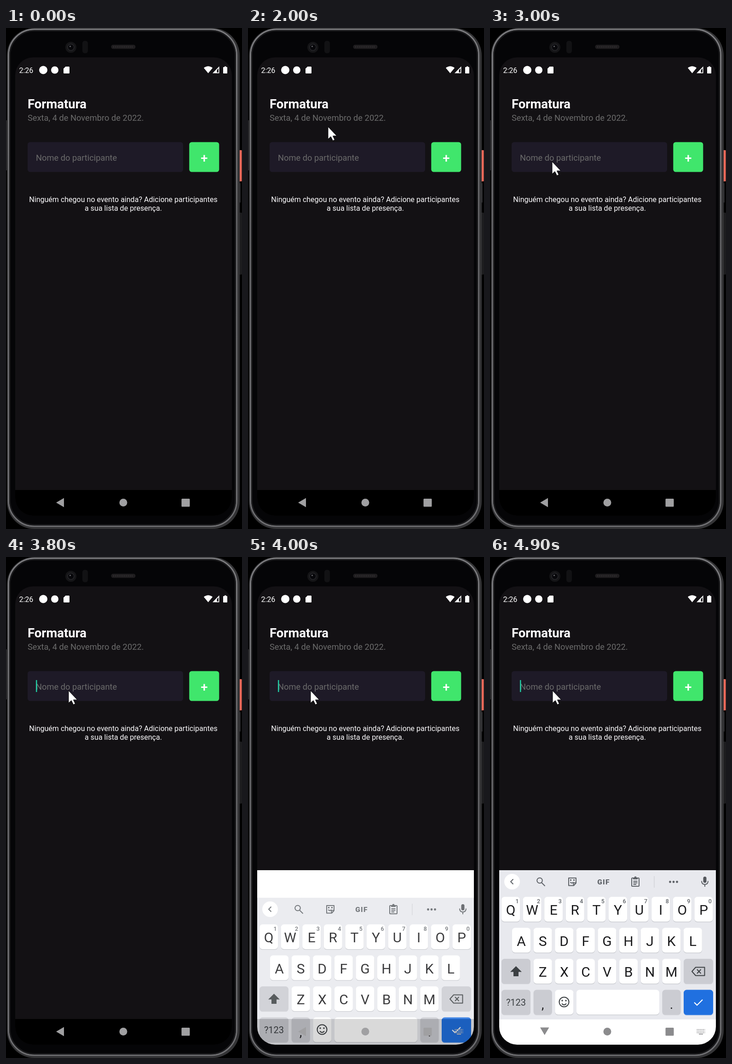
Write an HTML page that moves like this. It is 513 by 1091 pixels and loops after 5000 ms.

```html
<!DOCTYPE html>
<html lang="pt">
<head>
<meta charset="utf-8">
<title>Lista de presença</title>
<style>
  html, body { margin: 0; width: 100%; height: 100%; overflow: hidden; background: #000; }
  svg { display: block; width: 513px; height: 1091px; font-family: Roboto, sans-serif; }
  .mid { text-anchor: middle; }
  .line { fill: none; stroke: #5f6368; stroke-width: 2; stroke-linejoin: round; }
  .solid { fill: #5f6368; }
</style>
</head>
<body>
<svg viewBox="0 0 513 1091">
  <defs>
    <clipPath id="screen"><rect x="20" y="64" width="471" height="998" rx="39"/></clipPath>
    <linearGradient id="rim" x1="0" y1="0" x2="0" y2="1">
      <stop offset="0" stop-color="#7d7d80"/>
      <stop offset=".4" stop-color="#636366"/>
      <stop offset="1" stop-color="#707073"/>
    </linearGradient>
    <g id="clip">
      <rect class="line" x="-8" y="-8" width="16" height="18" rx="1.5"/>
      <path class="solid" d="M-5-9H-2.5a2.5 2.5 0 0 1 5 0H5V-5H-5Z"/>
      <path class="line" d="M-4.5-1H4.5M-4.5 2.5H4.5M-4.5 6H2"/>
    </g>
  </defs>

  <!-- phone body -->
  <rect width="513" height="1091" fill="#000"/>
  <rect x="0" y="201" width="3" height="109" fill="#252527"/>
  <rect x="507" y="266" width="5.500" height="68" rx="1" fill="#ee6a5b"/>
  <rect x="506" y="338" width="4" height="42" fill="#29292b"/>
  <rect x="506" y="402" width="7" height="135" rx="2" fill="#1d1d1f"/>
  <rect x="2" y="0" width="506" height="1091" rx="60" fill="#343436"/>
  <rect x="5.500" y="3" width="496" height="1082" rx="56" fill="#050507" stroke="url(#rim)" stroke-width="3"/>
  <rect x="8.500" y="6" width="490" height="1076" rx="53" fill="none" stroke="#1b1b1d" stroke-width="2.500"/>
  <circle cx="141" cy="42" r="12" fill="#151517"/>
  <circle cx="141" cy="42" r="7" fill="#08080b" stroke="#27272b" stroke-width="1.5"/>
  <circle cx="139.5" cy="40" r="1.6" fill="#66666c"/>
  <rect x="166" y="28" width="12" height="27" rx="5" fill="#121214"/>
  <rect x="228.5" y="36.5" width="53" height="9" rx="4.5" fill="#1f1d1f"/>
  <path d="M233 41H277" stroke="#2d2b2d" stroke-width="4" stroke-dasharray="2 2"/>

  <g clip-path="url(#screen)">
    <rect x="20" y="64" width="471" height="998" fill="#131114"/>
    <rect x="20" y="1006" width="471" height="56" fill="#000"/>

    <!-- status bar -->
    <g fill="#fff">
      <text x="28.5" y="97.5" font-size="16">2:26</text>
      <circle cx="81" cy="91.500" r="9"/>
      <circle cx="106" cy="91.500" r="8"/>
      <path d="M129.500 84H136.500Q138 84 138 85.500V97.500Q138 99 136.500 99H126.500Q125 99 125 97.500V88.500Z"/>
      <path d="M430 87Q439.500 79.500 449 87L439.500 98.500Z"/>
      <path d="M463.500 83.500V98.500H449ZM461.800 88L458.500 91.500V96.800H461.800Z" fill-rule="evenodd"/>
      <path d="M475 83.500H478.500V85H480Q481 85 481 86V98Q481 99 480 99H473Q472 99 472 98V86Q472 85 473 85H475Z"/>
    </g>

    <text x="47" y="175" font-size="27.500" font-weight="700" fill="#fdfcfe">Formatura</text>
    <text x="47" y="202" font-size="18.300" fill="#6b6b6b">Sexta, 4 de Novembro de 2022.</text>
    <rect x="47" y="248.500" width="338" height="65" rx="5.500" fill="#1e1a27"/>
    <text x="65" y="288.500" font-size="18.300" fill="#6b6b6b">Nome do participante</text>
    <rect x="398.300" y="248.500" width="65" height="65" rx="5.500" fill="#40e66c"/>
    <text class="mid" x="430.800" y="292.500" font-size="27.500" font-weight="500" fill="#fff">+</text>
    <g class="mid" font-size="16.040" fill="#fdfcfe">
      <text x="255" y="379">Ninguém chegou no evento ainda? Adicione participantes</text>
      <text x="255" y="397.500">a sua lista de presença.</text>
    </g>
    <rect id="caret" x="65" y="268" width="2.500" height="26" fill="#20c9a2"/>

    <rect id="panel" x="20" y="682" width="471" height="324" fill="#fff"/>
    <g id="board">
      <rect x="20" y="682" width="471" height="325" fill="#e8e9ee"/>
      <rect x="20" y="1007" width="471" height="60" fill="#fff"/>
      <circle cx="48" cy="707" r="17" fill="#fff"/>
      <path class="line" d="M50.500 701.500L45 707L50.500 712.500"/>
      <g id="toolsA">
        <use href="#clip" x="110" y="707"/>
        <g transform="translate(179 707)">
          <circle r="5.500" fill="none" stroke="#5f6368" stroke-width="4.500"/>
          <circle r="8.300" fill="none" stroke="#5f6368" stroke-width="3.500" stroke-dasharray="4.346 4.346"/>
        </g>
        <g transform="translate(247.500 707)">
          <path class="solid" d="M0-9.500C12-9.500 13 3 5 3C1 3 5 9.500 0 9.500C-13 9.500-13-9.500 0-9.500Z"/>
          <g fill="#e8e9ee"><circle cx="-5.500" cy="0" r="1.600"/><circle cx="-3" cy="-4.500" r="1.600"/><circle cx="2.500" cy="-4.500" r="1.600"/><circle cx="5.500" cy="-1" r="1.600"/></g>
        </g>
        <g transform="translate(316 707)">
          <path class="line" d="M2 8H-8.500V-8.500H8.500V9"/>
          <path class="solid" d="M-2-2L8 1V9.500H4Z"/>
        </g>
      </g>
      <g id="toolsB">
        <circle class="line" cx="108" cy="704.500" r="5.800"/>
        <path class="line" d="M112 709L119.500 716.500"/>
        <path class="line" d="M171 699H187V710L182 715.500H171ZM187 709.500H181.500V715.500M174.500 708Q178 712 181.500 708"/>
        <path class="solid" d="M174 702h3v3h-3zM181 702h3v3h-3z"/>
        <text class="mid" x="247" y="712.500" font-size="15.500" font-weight="900" letter-spacing="1.300" fill="#5f6368">GIF</text>
        <use href="#clip" x="316" y="707"/>
      </g>
      <path d="M357 695V720" stroke="#cfd1d6" stroke-width="1.300"/>
      <g class="solid"><circle cx="391.500" cy="707.500" r="2.400"/><circle cx="399" cy="707.500" r="2.400"/><circle cx="406.500" cy="707.500" r="2.400"/></g>
      <rect x="463.500" y="696" width="7" height="13.500" rx="3.500" fill="#54575c"/>
      <path class="line" d="M460 705.500Q460 713 467 713T474 705.500M467 713V718"/>
      <g id="keys"></g>
      <path d="M56.500 891L69 903.500H62V913H51V903.500H44Z" fill="#3c4043"/>
      <path class="line" d="M447 893.500H466.500V911.500H447L439 902.500ZM450 898L458.500 907M458.500 898L450 907" style="stroke:#3c4043"/>
      <circle class="line" cx="161" cy="969" r="10.500" style="stroke:#3c4043"/>
      <circle cx="157" cy="966" r="1.700" fill="#3c4043"/><circle cx="165" cy="966" r="1.700" fill="#3c4043"/>
      <path class="line" d="M156 972.500Q161 978 166 972.500" style="stroke:#3c4043"/>
      <path d="M444 970L450 976L462 964" fill="none" stroke="#fff" stroke-width="2.200"/>
    </g>

    <!-- navigation bar -->
    <g id="nav">
      <path id="back"/>
      <circle cx="255" cy="1033.500" r="8.500"/>
      <rect x="381.500" y="1025" width="18" height="17.500" rx="1.500"/>
    </g>
    <g id="swap" fill="none" stroke="#a2a2a4" stroke-width="2" stroke-dasharray="2 1.400">
      <path d="M449.500 1029H467.500M449.500 1032.500H467.500M449.500 1036H467.500"/>
      <path d="M454 1039H463" stroke-dasharray="none"/>
    </g>
  </g>
  <path id="mouse" d="M0 0V27L6 21.500L10.500 30.500L14.500 28.500L10.500 20H19Z" fill="#fff" stroke="#08080a" stroke-width="1"/>
</svg>
<script>
  const $ = id => document.getElementById(id);
  const LOOP = 5000, STEP = 100, PITCH = 46.6;

  function add(tag, attrs, text) {
    const el = document.createElementNS("http://www.w3.org/2000/svg", tag);
    for (const k in attrs) el.setAttribute(k, attrs[k]);
    if (text) el.textContent = text;
    $("keys").append(el);
  }

  function key(x, y, w, fill, label, size = 30, base = 39, ink = "#1b1b1d") {
    const box = { x, width: w, height: 54, rx: 6.5 };
    add("rect", { ...box, y: y + 1.3, fill: fill === "#fff" ? "#bfc1c6" : fill, opacity: .8 });
    add("rect", { ...box, y, fill });
    if (label) add("text", { x: x + w / 2, y: y + base, class: "mid", "font-size": size, fill: ink }, label);
  }

  function row(letters, x, y, digits) {
    [...letters].forEach((c, i) => {
      const left = x + i * PITCH;
      key(left, y, 40, "#fff", c);
      if (digits) add("text", { x: left + 34, y: y + 13.5, class: "mid", "font-size": 12.5, "font-weight": 500, fill: "#5f6368" }, String((i + 1) % 10));
    });
  }

  const GREY = "#cbccd2", DARK = "#3c4043";
  row("QWERTYUIOP", 25, 740, true);
  row("ASDFGHJKL", 48, 807.5);
  row("ZXCVBNM", 94.7, 875);
  key(25, 875, 63, GREY);
  key(421, 875, 64, GREY);
  key(25, 942.5, 63, GREY, "?123", 20, 34, DARK);
  key(94.7, 942.5, 40, GREY, ",", 27, 41);
  key(141.3, 942.5, 40, "#fff");
  key(188, 942.5, 180, "#fff");
  key(374.5, 942.5, 40, GREY, ".", 27, 41);
  key(421, 942.5, 64, "#2070e0");

  // [time, x, y] and [time, offset, opacity]
  const MOUSE = [[1600, 22, 315], [1700, 90, 262], [1800, 150, 226], [2000, 174, 215], [2200, 182, 340],
    [2400, 170, 521], [2500, 152, 529], [2700, 122, 390], [2800, 126, 315], [3000, 135, 291], [3300, 136, 291]];
  const SLIDE = [[3900, 211, .35], [4000, 60, .85], [4100, 6, 1], [4200, 1, 1], [4300, 0, 1]];

  function at(track, t) {
    const i = track.findIndex(p => p[0] > t);
    if (i < 0) return track[track.length - 1].slice(1);
    if (i === 0) return track[0].slice(1);
    const a = track[i - 1], b = track[i], k = (t - a[0]) / (b[0] - a[0]);
    return [a[1] + (b[1] - a[1]) * k, a[2] + (b[2] - a[2]) * k];
  }

  const show = (id, on) => $(id).setAttribute("visibility", on ? "inherit" : "hidden");

  function draw(ms) {
    const t = Math.floor(ms % LOOP / STEP) * STEP;
    const open = t >= 3900, settled = t >= 4300;

    const [x, y] = at(MOUSE, t);
    show("mouse", t >= 1600);
    $("mouse").setAttribute("transform", `translate(${x} ${y})`);
    show("caret", t >= 3500 && (t < 4400 || t >= 4900));

    const [shift, alpha] = at(SLIDE, t);
    ["panel", "board", "swap"].forEach(id => show(id, open));
    $("board").setAttribute("transform", `translate(0 ${shift})`);
    $("board").setAttribute("opacity", alpha);
    show("toolsA", t < 4000);
    show("toolsB", t >= 4000);

    $("back").setAttribute("d", settled ? "M109 1024.500H128.500L118.700 1041Z" : "M109 1033.500L126 1023.500V1043.500Z");
    $("nav").setAttribute("fill", settled ? "#8b8b8d" : "#a0a0a2");
  }

  const start = performance.now();
  function tick() {
    draw(performance.now() - start);
    requestAnimationFrame(tick);
  }
  tick();
</script>
</body>
</html>
```
